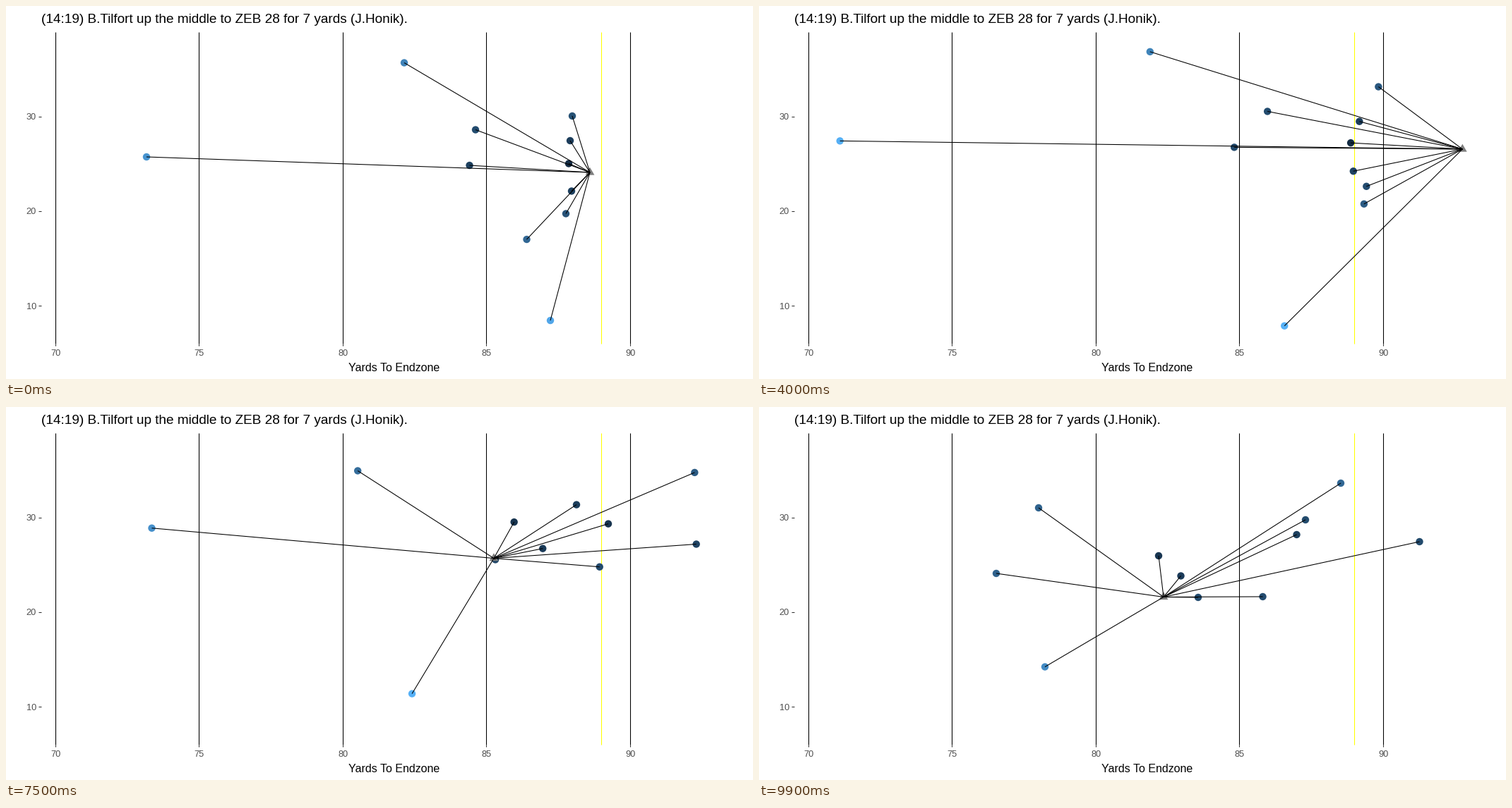
A matplotlib script that plays this animation: 1058x529 px, repeating every 10000 ms.

```python
import numpy as np
import matplotlib.pyplot as plt
from matplotlib.animation import FuncAnimation
from matplotlib.collections import LineCollection
from matplotlib.patches import Polygon

W, H, DPI = 1058, 529, 64
PX = 72 / DPI  # points per pixel
FRAMES, INTERVAL = 100, 100
YARD_X, YARD_Y = 40.68, 13.42  # pixels per yard
TURNS = (0, 29, 53, 85, 99)  # frames at which defenders pass their waypoints
DARK, LIGHT = np.array([19, 43, 67]) / 255, np.array([86, 177, 247]) / 255

plt.rcParams["font.family"] = "Liberation Sans"


def route(*points, times=TURNS):
    """Smooth path through the waypoints, one position per frame."""
    t, p = np.array(times, float), np.array(points, float)
    slope = np.gradient(p, t, axis=0)
    frame = np.arange(FRAMES)
    i = np.clip(np.searchsorted(t, frame, side="right") - 1, 0, len(t) - 2)
    h = (t[i + 1] - t[i])[:, None]
    u = (frame - t[i])[:, None] / h
    return ((1 + 2 * u) * (1 - u) ** 2 * p[i] + u * (1 - u) ** 2 * h * slope[i]
            + u * u * (3 - 2 * u) * p[i + 1] + u * u * (u - 1) * h * slope[i + 1])


def shade(spots):
    """Lighter with distance from the middle of the group, less so upfield."""
    gap = (spots - np.median(spots, axis=0)) / (YARD_X, YARD_Y)
    gap[..., 0] = np.where(gap[..., 0] > 0, gap[..., 0] / 2, gap[..., 0])
    level = np.clip(np.linalg.norm(gap, axis=-1) / 18, 0, 1)[..., None]
    return DARK + level * (LIGHT - DARK)


paths = np.array([
    # deep
    route((199, 214), (145.5, 206.5), (96.5, 174.5), (267.5, 188), (336, 236)),
    route((564, 80.5), (557, 75.3), (544, 57), (463, 112.3), (396, 143)),
    route((771, 446), (767, 449), (700.5, 453.5), (506.5, 385.5), (405, 368.5)),
    route((802, 156), (831.5, 137.5), (932, 89), (945, 100), (824, 108)),
    # second level
    route((665, 175.5), (680, 163), (771, 135), (804.5, 146), (774, 160)),
    route((656.5, 226), (660, 220), (688, 181.5), (676, 240), (622, 270)),
    # front
    route((797, 223.5), (830.5, 215.5), (829.5, 169), (655.5, 175.5), (566, 211)),
    route((799, 191), (828, 176), (871, 152), (824.5, 174), (761.5, 181)),
    route((801, 262.5), (810, 250), (866, 215.5), (692, 208), (597.5, 239.5)),
    route((737.5, 331), (822, 314), (883.5, 241), (796.5, 237), (713.5, 269)),
    route((793, 294.5), (825.5, 280), (906, 224.5), (981.5, 189), (935.5, 191)),
])
shades = shade(paths)
carrier = route((827, 236), (828, 236), (840, 234), (902, 226), (1004, 195),
                (942, 181.7), (775, 194), (624.5, 241), (573, 269.5),
                times=(0, 15, 22, 29, 44, 53, 66, 85, 99))

fig = plt.figure(figsize=(W / DPI, H / DPI), dpi=DPI, facecolor="white")
ax = fig.add_axes([0, 0, 1, 1])
ax.set(xlim=(0, W), ylim=(H, 0))
ax.axis("off")


def rule(xs, ys, color):
    ax.plot(xs, ys, color=color, lw=1.07 * PX, solid_capstyle="butt", zorder=1)


def label(x, y, text, size, color="black", ha="center"):
    ax.text(x, y, text, fontsize=size * PX, color=color, ha=ha, va="baseline")


def field_x(yards):
    return 70 + YARD_X * (yards - 70)


for yards in range(70, 91, 5):
    x = field_x(yards)
    rule([x, x], [37, 479], "black")
    rule([x, x], [479, 482], "#333333")
    label(x + 0.4, 496.5, str(yards), 12.8, "#4d4d4d")
rule([field_x(89)] * 2, [37, 479], "#ffff00")
for width in (10, 20, 30):
    y = 156.8 + YARD_Y * (30 - width)
    rule([46, 50], [y, y], "#333333")
    label(42.8, y + 4.3, str(width), 12.8, "#4d4d4d", "right")
label(50.5, 23.8, "(14:19) B.Tilfort up the middle to ZEB 28 for 7 yards (J.Honik).",
      18.95, ha="left")
label(549.5, 518, "Yards To Endzone", 16)

dots = ax.scatter(*paths[:, 0].T, s=(10.4 * PX) ** 2, linewidths=0, zorder=2)
TRIANGLE = np.array([[0, -7.3], [6.4, 3.7], [-6.4, 3.7]])
marker = ax.add_patch(Polygon(TRIANGLE, fc="#7f7f7f", ec="none", zorder=3))
links = ax.add_collection(LineCollection([], colors="black",
                                         linewidths=1.07 * PX, zorder=4))


def update(frame):
    spots, ball = paths[:, frame], carrier[frame]
    dots.set_offsets(spots)
    dots.set_facecolor(shades[:, frame])
    marker.set_xy(TRIANGLE + ball)
    links.set_segments([[spot, ball] for spot in spots])
    return dots, marker, links


anim = FuncAnimation(fig, update, frames=FRAMES, interval=INTERVAL,
                     init_func=lambda: update(0), repeat=True, repeat_delay=0)
plt.show()
```
